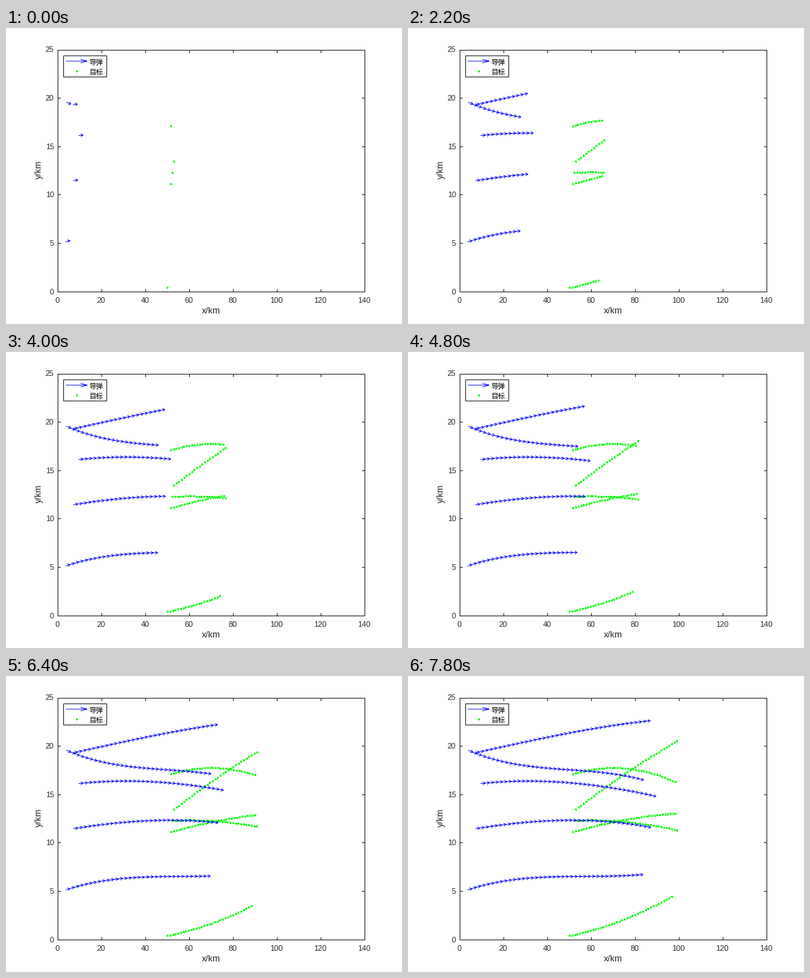
A matplotlib script that plays this animation: 560x420 px, repeating every 8000 ms.

```python
import numpy as np
import matplotlib.pyplot as plt
from matplotlib.animation import FuncAnimation
from matplotlib.patches import Rectangle

W, H, DPI = 560, 420, 100
PX = 72 / DPI                      # points per pixel
LEFT, RIGHT, TOP, BOTTOM = 72.5, 506.5, 30.5, 373.5
XMAX, YMAX = 140, 25
FRAMES, INTERVAL = 40, 200
INK = "#262626"
BLUE, GREEN = "#0000ff", "#00ff00"
MISSILE_STEP, TARGET_STEP = 2.0, 1.2   # km flown per frame

plt.rcParams["font.family"] = "Liberation Sans"

# start x, start y (km), then climb, bend and twist of the height over one loop
MISSILES = [
    (4.00, 19.57, -8.03, 11.75, -6.80),
    (7.00, 19.29, 4.00, 0.05, -0.72),
    (9.60, 16.12, 1.93, -3.75, 0.50),
    (7.20, 11.45, 2.93, -1.99, -0.80),
    (3.65, 5.12, 6.05, -8.86, 4.40),
]
TARGETS = [
    (51.6, 17.13, 3.25, -4.22),
    (52.9, 13.45, 8.30, -1.07),
    (52.4, 12.30, 0.52, -1.58),
    (51.8, 11.15, 3.10, -1.18),
    (50.1, 0.40, 2.17, 2.05),
]


def track(speed, x0, y0, climb, bend, twist=0):
    """Positions in pixels at every frame, at constant speed along the path."""
    u = np.arange(FRAMES + 1) / FRAMES
    y = y0 + u * (climb + u * (bend + u * twist))
    dx = speed / np.hypot(1, np.gradient(y, speed))
    x = x0 + np.cumsum(dx) - dx
    return np.column_stack([LEFT + .4 + x * (RIGHT - LEFT) / XMAX,
                            BOTTOM + .3 - y * (BOTTOM - TOP) / YMAX])


def arrows(pts, length, half):
    """One polyline with gaps: a shaft and an open head per segment."""
    tail, tip = pts[:-1], pts[1:]
    d = tip - tail
    d = d / np.linalg.norm(d, axis=1, keepdims=True)
    n = np.column_stack([-d[:, 1], d[:, 0]])
    base = tip - length * d
    gap = np.full_like(tip, np.nan)
    parts = [tail, tip, gap, base + half * n, tip, base - half * n, gap]
    return np.stack(parts, axis=1).reshape(-1, 2).T


fig = plt.figure(figsize=(W / DPI, H / DPI), dpi=DPI, facecolor="white")

# plot frame with ticks on all four sides
ax = fig.add_axes([LEFT / W, 1 - BOTTOM / H,
                   (RIGHT - LEFT) / W, (BOTTOM - TOP) / H])
ax.set(xlim=(0, XMAX), ylim=(0, YMAX),
       xticks=range(0, XMAX + 1, 20), yticks=range(0, YMAX + 1, 5))
ax.tick_params(direction="in", top=True, right=True, length=4.3 * PX,
               width=PX, color=INK, labelcolor=INK, labelsize=11 * PX)
ax.tick_params(axis="x", pad=8 * PX)
ax.tick_params(axis="y", pad=4.5 * PX)
for spine in ax.spines.values():
    spine.set(linewidth=PX, edgecolor=INK)

# overlay measured in pixels
cv = fig.add_axes([0, 0, 1, 1])
cv.set(xlim=(0, W), ylim=(H, 0))
cv.axis("off")


def blue_line(z=4):
    return cv.plot([], [], color=BLUE, lw=.85 * PX, zorder=z,
                   solid_joinstyle="round", solid_capstyle="butt")[0]


def green_dots(z=3):
    return cv.plot([], [], "o", color=GREEN, ms=3 * PX, mew=0, zorder=z,
                   snap=False)[0]


def label(x, y, text, size, **kw):
    cv.text(x, y, text, fontsize=size * PX, **kw)


label(290, 405, "x/km", 12.5, color=INK, ha="center", va="baseline")
label(47, 201, "y/km", 12.5, color=INK, ha="center", va="center", rotation=90)

# legend
cv.add_patch(Rectangle((80.5, 38.5), 61, 30, fc="white", ec=INK, lw=PX,
                       zorder=5))
blue_line(6).set_data(*arrows(np.array([[84.5, 47], [114.5, 47]]), 9, 2.5))
green_dots(6).set_data([99.5], [61])
for y, word in ((47.5, "导弹"), (61.5, "目标")):
    label(117.5, y, word, 10, color="black", va="center_baseline", zorder=6,
          family="Noto Sans CJK JP")

missiles = [(blue_line(), track(MISSILE_STEP, *m)) for m in MISSILES]
targets = [(green_dots(), track(TARGET_STEP, *t)) for t in TARGETS]


def draw(i):
    for line, path in missiles:
        line.set_data(*arrows(path[:i + 2], 3.2, 2.1))
    for dots, path in targets:
        dots.set_data(*path[:i + 1].T)
    return [artist for artist, _ in missiles + targets]


anim = FuncAnimation(fig, draw, frames=FRAMES, init_func=lambda: draw(0),
                     interval=INTERVAL, repeat=True, repeat_delay=0)
plt.show()
```
